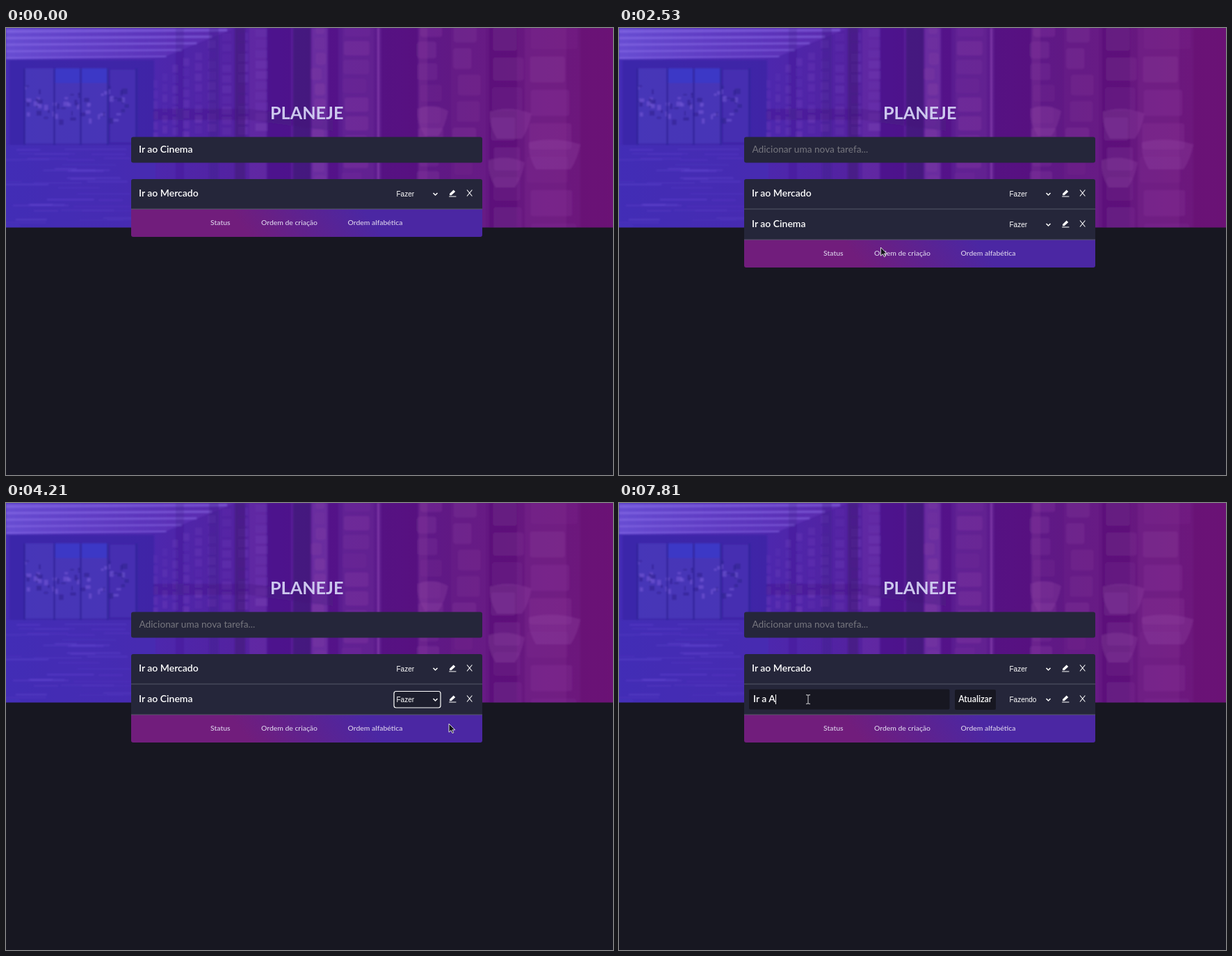
Recreate the animation shown at these times as an HTML page. Size 873 px wide and 642 px high, loop 8 s.

```html
<!DOCTYPE html>
<html lang="pt">
<head>
<meta charset="utf-8">
<title>Lista de tarefas</title>
<style>
html, body { margin: 0; width: 100%; height: 100%; overflow: hidden; background: #171721; }
svg { display: block; width: 100%; height: 100%; }
text { font: 600 14px Lato, sans-serif; fill: #fff; white-space: pre; }
.title { font-size: 25.2px; font-weight: 700; fill: #cdc8ee; }
.hint { font-weight: 400; fill: #77777f; }
.sort { font-size: 10.4px; font-weight: 500; fill: #dcd3ec; text-anchor: middle; }
.pick { font: 10px "Liberation Sans", Arial, sans-serif; }
.option { font: 9.5px "Liberation Sans", Arial, sans-serif; }
.button { font-size: 12.3px; text-anchor: middle; }
.card { fill: #25263a; }
.dark { fill: #171721; }
</style>
</head>
<body>
<svg viewBox="0 0 873 642" preserveAspectRatio="none">
  <defs>
    <linearGradient id="sky">
      <stop offset="0" stop-color="#442bb5"/>
      <stop offset=".25" stop-color="#4d27ad"/>
      <stop offset=".5" stop-color="#591d94"/>
      <stop offset=".75" stop-color="#611883"/>
      <stop offset="1" stop-color="#70177a"/>
    </linearGradient>
    <linearGradient id="bar" gradientUnits="userSpaceOnUse" x1="370" y1="66" x2="495" y2="-26">
      <stop offset="0" stop-color="#711d7c"/>
      <stop offset="1" stop-color="#4b27a3"/>
    </linearGradient>
    <linearGradient id="ceiling" x2="1">
      <stop offset="0" stop-color="#8064e6" stop-opacity=".6"/>
      <stop offset="1" stop-color="#6f38c4" stop-opacity=".25"/>
    </linearGradient>
    <filter id="soft"><feGaussianBlur stdDeviation="1"/></filter>
    <filter id="shade" x="-50%" y="-50%" width="200%" height="250%">
      <feDropShadow dx="0" dy="14" stdDeviation="11" flood-color="#000" flood-opacity=".4"/>
    </filter>
    <clipPath id="top"><rect width="873" height="286.5"/></clipPath>
  </defs>
  <rect width="873" height="642" class="dark"/>
  <g clip-path="url(#top)">
    <rect width="873" height="287" fill="url(#sky)"/>
    <g id="hall" filter="url(#soft)"></g>
  </g>
  <text class="title" x="380" y="131">PLANEJE</text>
  <g id="app"></g>
</svg>
<script>
const $ = id => document.getElementById(id);
const LOOP = 8000;
const pen = document.createElement('canvas').getContext('2d');

const clamp = v => Math.min(1, Math.max(0, v));
const ramp = (t, a, b) => clamp((t - a) / (b - a));
const smooth = k => k * k * (3 - 2 * k);
const rect = (x, y, w, h, attrs = '') =>
  `<rect x="${x}" y="${y}" width="${w}" height="${h}" ${attrs}/>`;
const label = (x, y, s, cls = '', attrs = '') =>
  `<text x="${x}" y="${y}" class="${cls}" ${attrs}>${s}</text>`;
const fill = (color, alpha) => `fill="${color}" fill-opacity="${alpha}"`;

// Tinted corridor behind the title
function hall() {
  let seed = 11;
  const rnd = (a = 0, b = 1) => {
    seed = (seed * 16807) % 2147483647;
    return a + (b - a) * seed / 2147483647;
  };
  let s = '<path d="M0 0H330L226 42L0 45Z" fill="url(#ceiling)"/>';
  for (let i = 0; i < 5; i++) {
    const y = 3 + i * 9.5;
    s += `<path d="M0 ${y + 2}L${325 - y * 2.3} ${y}" stroke="#9276ee" stroke-opacity=".45" stroke-width="${4 - i * .5}"/>`;
  }
  // Entrance
  s += rect(5, 46, 208, 122, fill('#3325a0', .5));
  s += rect(27, 58, 120, 108, fill('#5442c6', .5));
  s += rect(150, 60, 36, 104, fill('#4c36b8', .6));
  s += rect(68, 58, 77, 21, fill('#3c38c8', .9));
  for (let i = 0; i < 60; i++)
    s += rect(rnd(27, 178), rnd(82, 132), rnd(2, 8), rnd(2, 8),
      rnd() < .5 ? fill('#7a60dc', .5) : fill('#2f1f8c', .55));
  for (const x of [25, 68, 106, 145, 186])
    s += rect(x, 58, 3, 110, fill('#32249c', .8));
  s += rect(0, 168, 215, 119, fill('#3f2fb6', .4));
  for (let i = 0; i < 38; i++)
    s += rect(rnd(-30, 150), rnd(172, 286), rnd(30, 90), rnd(1, 2.6), fill('#7156dc', rnd(.08, .3)));
  // Receding brick wall
  for (let x = 212, w = 9; x < 380; x += w + 4, w *= 1.13)
    for (let y = rnd(0, 10) + Math.max(0, 70 - (x - 212) * .7); y < 150; y += 15)
      s += rect(x, y, w * .7, 11, fill(y > 112 ? '#8b50c4' : '#7544c0', rnd(.08, .3)));
  // Columns: x, width, tone, alpha
  const columns = [
    [244, 12, '#3a1a80', .2], [292, 14, '#3a1a80', .3], [329, 15, '#3a126e', .45],
    [350, 24, '#8142b4', .25], [376, 34, '#42107a', .4], [413, 25, '#38106c', .55],
    [440, 22, '#8b4bb4', .35], [464, 14, '#4a1178', .35], [484, 45, '#7b35a2', .2],
    [534, 3, '#9d55be', .45], [540, 52, '#4b0d72', .35], [594, 12, '#843799', .3],
    [640, 50, '#7b2c90', .18], [695, 40, '#50106f', .35], [746, 60, '#8a3494', .2],
    [826, 47, '#58105f', .2]];
  for (const [x, w, c, a] of columns) s += rect(x, 0, w, 287, fill(c, a));
  for (const [x, w, step] of [[442, 18, 22], [486, 40, 27], [594, 38, 31], [646, 36, 38], [700, 48, 43], [752, 70, 48]])
    for (let y = rnd(-12, 5); y < 286; y += step)
      s += rect(x + rnd(-4, 4), y, w * rnd(.7, 1), step * .78, `rx="4" ${fill('#964aa8', rnd(.08, .25))}`);
  // Mouldings
  s += '<path d="M212 116H350L470 132V148L350 132H212Z" fill="#42127a" fill-opacity=".25"/>';
  for (const [x, y, w] of [[592, 116, 44], [696, 120, 60], [752, 164, 74], [694, 190, 52]])
    s += `<path d="M${x} ${y}q${w / 2} -9 ${w} 3q-4 22 -14 36H${x + 10}q-12 -20 -10 -39" fill="#9d50ac" fill-opacity=".25"/>`;
  return s;
}

// Pointer moves: start, end, from, bend, to
const moves = [
  [260, 800, 818, 640, 420, 300, 299, 170],
  [2230, 2880, 299, 170, 340, 420, 588, 279],
  [3040, 3130, 588, 279, 584, 292, 583, 304],
  [3130, 3350, 583, 304, 583, 308, 585, 312],
  [3650, 4210, 585, 312, 625, 330, 637, 317],
  [4210, 4440, 637, 317, 646, 322, 652, 322],
  [4470, 5180, 652, 322, 650, 290, 643, 284],
  [5350, 5870, 643, 284, 450, 333, 272, 282]];

function pointer(t) {
  const m = moves.filter(m => t >= m[0]).pop();
  if (!m) return null;
  const [a, b, x0, y0, cx, cy, x1, y1] = m;
  const k = smooth(ramp(t, a, b)), j = 1 - k;
  return [j * j * x0 + 2 * j * k * cx + k * k * x1, j * j * y0 + 2 * j * k * cy + k * k * y1];
}

const shapes = {
  arrow: '<path d="M0 0V12.2L3 9.6L5 13.6L6.8 12.8L5 8.9H8.8Z" fill="#14141c" stroke="#f2f2f2" stroke-width=".9"/>',
  beam: '<path d="M-3 -6.5Q0 -6.5 0 -5Q0 -6.5 3 -6.5M0 -5V5M-3 6.5Q0 6.5 0 5Q0 6.5 3 6.5" fill="none" stroke="#a9a9ad" stroke-width="1.3"/>',
  hand: '<path d="M-1 1Q0 -.8 1 1V5L5 6Q6.4 6.4 6 8.5L5 13H-.5L-3.6 8.4Q-3.6 6.8 -2 7.6L-1 8.4Z" fill="#14141c" stroke="#f2f2f2" stroke-width=".9"/>'
};

function drawPointer(p, editing) {
  if (!p) return '';
  const [x, y] = p;
  const inside = (l, t, r, b) => x > l && x < r && y > t && y < b;
  const kind = inside(180, 156, 685, 193) || editing && inside(187, 267, 475, 297) ? 'beam'
    : inside(636, 274, 649, 288) ? 'hand' : 'arrow';
  return `<g transform="translate(${x} ${y})">${shapes[kind]}</g>`;
}

function caret(x, y, text, size) {
  pen.font = `600 ${size}px Lato, sans-serif`;
  return rect(Math.round(x + pen.measureText(text).width), y, 1, 14, 'fill="#fff"');
}

function picker(y, value, grow = 0, ring = false) {
  let s = '';
  if (grow) s += rect(558, y + 9.5, 67, 23, `rx="3" class="dark" opacity="${grow}"`);
  if (ring) s += rect(558, y + 9.5, 67, 23.5, 'rx="3" fill="#1d1e2d" stroke="#fff" stroke-width="1.2"');
  s += `<g opacity="${1 - grow * .48}">` + label(561.5, y + 25, value, 'pick') +
    `<path d="M614.5 ${y + 20}l3 3l3 -3" fill="none" stroke="#fff" stroke-width="1.5"/></g>`;
  return `<g transform="translate(591.5 ${y + 21}) scale(${1 + grow * .15}) translate(-591.5 ${-y - 21})">${s}</g>`;
}

function icons(y, hover = false) {
  return `<g transform="translate(637 ${y + 15})"><path d="M1 8.3V6L6.6 .6L9.2 3L3.6 8.3ZM.2 9.4H10.4V10.6H.2Z" fill="#fff" opacity="${hover ? .4 : 1}"/>` +
    '<path d="M26 .5L33.4 9.5M33.4 .5L26 9.5" stroke="#fff" stroke-width="1.1"/></g>';
}

function menu(t) {
  const pick = t < 3200 ? 0 : 1;
  return rect(553.5, 295.5, 76.5, 36.5, 'rx="3" fill="#25263a" stroke="#55566a" stroke-width=".8" filter="url(#shade)"') +
    rect(554, 296 + pick * 12, 75.5, 12, 'fill="#1e90ff"') +
    ['Fazer', 'Fazendo', 'Feito'].map((s, i) => label(556.5, 304.5 + i * 12, s, 'option')).join('');
}

function editor(t) {
  const typed = [[6640, 'I'], [6850, 'Ir'], [7180, 'Ir '], [7380, 'Ir a'], [7480, 'Ir a '], [7810, 'Ir a A']]
    .filter(k => t >= k[0]).map(k => k[1]).pop() || '';
  const ready = ramp(t, 6640, 6850);
  return rect(187, 267.5, 288.5, 29, 'rx="2" class="dark"') +
    (typed ? label(193, 286, typed) : label(193, 286, 'Digite para atualizar sua tarefa', 'hint', 'style="font-size:14.4px"')) +
    (typed || t >= 5870 && t < 6370 ? caret(192, 275, typed, 14) : '') +
    `<g opacity="${.5 + ready * .5}">` + rect(483, 268, 59, 29, 'rx="2" class="dark"') +
    label(512.3, 286, 'Atualizar', 'button') + '</g>';
}

function entry(t) {
  let s = rect(180, 156.5, 505, 37, 'rx="3" class="card"');
  if (t < 1800) {
    s += label(191, 179, 'Ir ao Cinema');
    if (t >= 260 && (t - 260) % 1000 < 500) s += caret(191, 168, 'Ir ao Cinema', 14);
  } else {
    s += label(191.5, 179, 'Adicionar uma nova tarefa...', 'hint', 'style="font-size:13.7px"');
    if (t < 2950 && (t - 1800) % 1000 < 500) s += caret(191, 168, '', 14);
  }
  return s;
}

function app(t) {
  const added = t >= 2060, editing = t >= 5310;
  const open = t >= 2960 && t < 3650;
  const bottom = added ? 304 : 260;
  const p = pointer(t);
  let s = entry(t);
  s += `<path d="M180 ${bottom}V220q0 -3 3 -3H682q3 0 3 3V${bottom}Z" class="card"/>`;
  s += `<g transform="translate(0 ${bottom})"><path d="M180 0H685V37q0 3 -3 3H183q-3 0 -3 -3Z" fill="url(#bar)"/>` +
    label(308.3, 23, 'Status', 'sort') + label(407.5, 23, 'Ordem de criação', 'sort') +
    label(531, 23, 'Ordem alfabética', 'sort') + '</g>';
  s += rect(180, 259.5, 505, 1, 'fill="#565868"');
  s += label(191, 242, 'Ir ao Mercado') + picker(217, 'Fazer') + icons(217);
  if (added) {
    const grow = smooth(ramp(t, 2840, 2980)) * (1 - smooth(ramp(t, 3650, 3790)));
    const hover = p && Math.hypot(p[0] - 643, p[1] - 282) < 7;
    s += rect(180, 303.5, 505, 1, 'fill="#565868"');
    s += editing ? editor(t) : label(191, 286, 'Ir ao Cinema');
    s += picker(261, t < 4470 ? 'Fazer' : 'Fazendo', grow, t >= 3720 && !editing) + icons(261, hover);
  }
  if (open) s += menu(t);
  return s + drawPointer(p, editing);
}

$('hall').innerHTML = hall();
const start = performance.now();
function frame() {
  $('app').innerHTML = app((performance.now() - start) % LOOP);
  requestAnimationFrame(frame);
}
frame();
</script>
</body>
</html>
```
